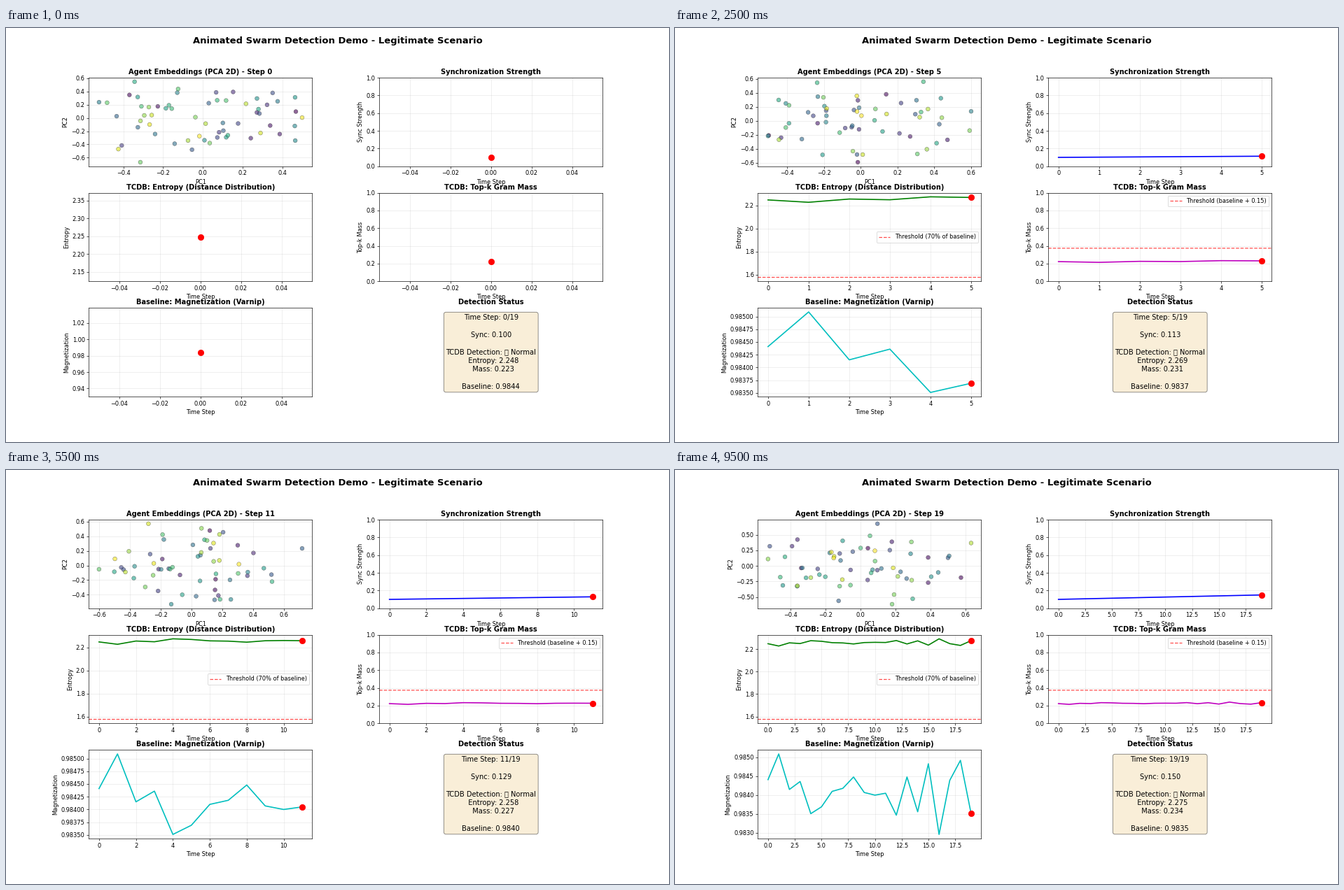
A matplotlib script that plays this animation: 947x592 px, repeating every 10 s.

```python
import numpy as np
import matplotlib.pyplot as plt
from matplotlib.animation import FuncAnimation

WIDTH, HEIGHT, DPI = 947, 592, 59.1875
STEPS, AGENTS, DIMS = 20, 60, 32
BASELINE_STEPS = 5

# Key points of the magnetization curve, in 1e-5 above 0.98.
KEY_POINTS = [441, 509, 415, 436, 351, 369, 410, 418, 448, 407,
              400, 405, 347, 448, 356, 483, 296, 439, 492, 351]

magnetization = 0.98 + np.array(KEY_POINTS) * 1e-5
# Entropy and Gram mass both rise as magnetization falls.
drop = 0.9841 - magnetization
entropy = 2.257 + 30 * drop
mass = 0.2265 + 12 * drop
sync = np.linspace(0.1, 0.15, STEPS)

fig = plt.figure(figsize=(WIDTH / DPI + 1e-6, HEIGHT / DPI + 1e-6), dpi=DPI)
fig.suptitle("Animated Swarm Detection Demo - Legitimate Scenario",
             fontsize=16, fontweight="bold")
grid = fig.add_gridspec(3, 2, hspace=0.3, wspace=0.3)
(ax_agents, ax_sync, ax_entropy,
 ax_mass, ax_base, ax_status) = [fig.add_subplot(cell) for cell in grid]


def embeddings(step):
    """Random unit vectors reduced to their two principal components."""
    vectors = np.random.default_rng(step).normal(size=(AGENTS, DIMS))
    vectors /= np.linalg.norm(vectors, axis=1, keepdims=True)
    vectors -= vectors.mean(axis=0)
    axes = np.linalg.svd(vectors, full_matrices=False)[2]
    return vectors @ axes[:2].T


def decorate(ax, title, xlabel, ylabel):
    ax.set_title(title, fontweight="bold")
    ax.set_xlabel(xlabel)
    ax.set_ylabel(ylabel)
    ax.grid(True, alpha=0.3)


def draw_agents(step):
    ax_agents.clear()
    ax_agents.scatter(*embeddings(step).T, c=np.arange(AGENTS), cmap="viridis",
                      s=50, alpha=0.6, edgecolors="black", linewidths=0.5)
    decorate(ax_agents, f"Agent Embeddings (PCA 2D) - Step {step}", "PC1", "PC2")


def draw_series(ax, values, step, color, title, ylabel, ylim=None):
    ax.clear()
    ax.plot(np.arange(step + 1), values[:step + 1], color + "-", linewidth=2)
    ax.plot(step, values[step], "ro", markersize=10, snap=False)
    decorate(ax, title, "Time Step", ylabel)
    if ylim:
        ax.set_ylim(*ylim)


def draw_threshold(ax, level, label, loc):
    ax.axhline(level, color="r", linestyle="--", alpha=0.7, label=label, snap=False)
    ax.legend(loc=loc)


def draw_status(step):
    ax_status.clear()
    ax_status.axis("off")
    ax_status.set_title("Detection Status", fontweight="bold")
    lines = [
        f"Time Step: {step}/{STEPS - 1}", "",
        f"Sync: {sync[step]:.3f}", "",
        "TCDB Detection: \u2705 Normal",
        f"  Entropy: {entropy[step]:.3f}",
        f"  Mass: {mass[step]:.3f}", "",
        f"Baseline: {magnetization[step]:.4f}",
    ]
    ax_status.text(0.5, 0.5, "\n".join(lines), transform=ax_status.transAxes,
                   ha="center", va="center", fontsize=12, linespacing=1.29,
                   bbox=dict(boxstyle="round", facecolor="wheat", alpha=0.5))


def update(step):
    draw_agents(step)
    draw_series(ax_sync, sync, step, "b", "Synchronization Strength",
                "Sync Strength", (0, 1))
    draw_series(ax_entropy, entropy, step, "g",
                "TCDB: Entropy (Distance Distribution)", "Entropy")
    draw_series(ax_mass, mass, step, "m", "TCDB: Top-k Gram Mass",
                "Top-k Mass", (0, 1))
    draw_series(ax_base, magnetization, step, "c",
                "Baseline: Magnetization (Varnip)", "Magnetization")
    if step + 1 >= BASELINE_STEPS:
        draw_threshold(ax_entropy, 0.7 * entropy[:BASELINE_STEPS].mean(),
                       "Threshold (70% of baseline)", "center right")
        draw_threshold(ax_mass, mass[:BASELINE_STEPS].mean() + 0.15,
                       "Threshold (baseline + 0.15)", "upper right")
    draw_status(step)


animation = FuncAnimation(fig, update, frames=STEPS, interval=500,
                          init_func=lambda: None, repeat=True, repeat_delay=0)
plt.show()
```
